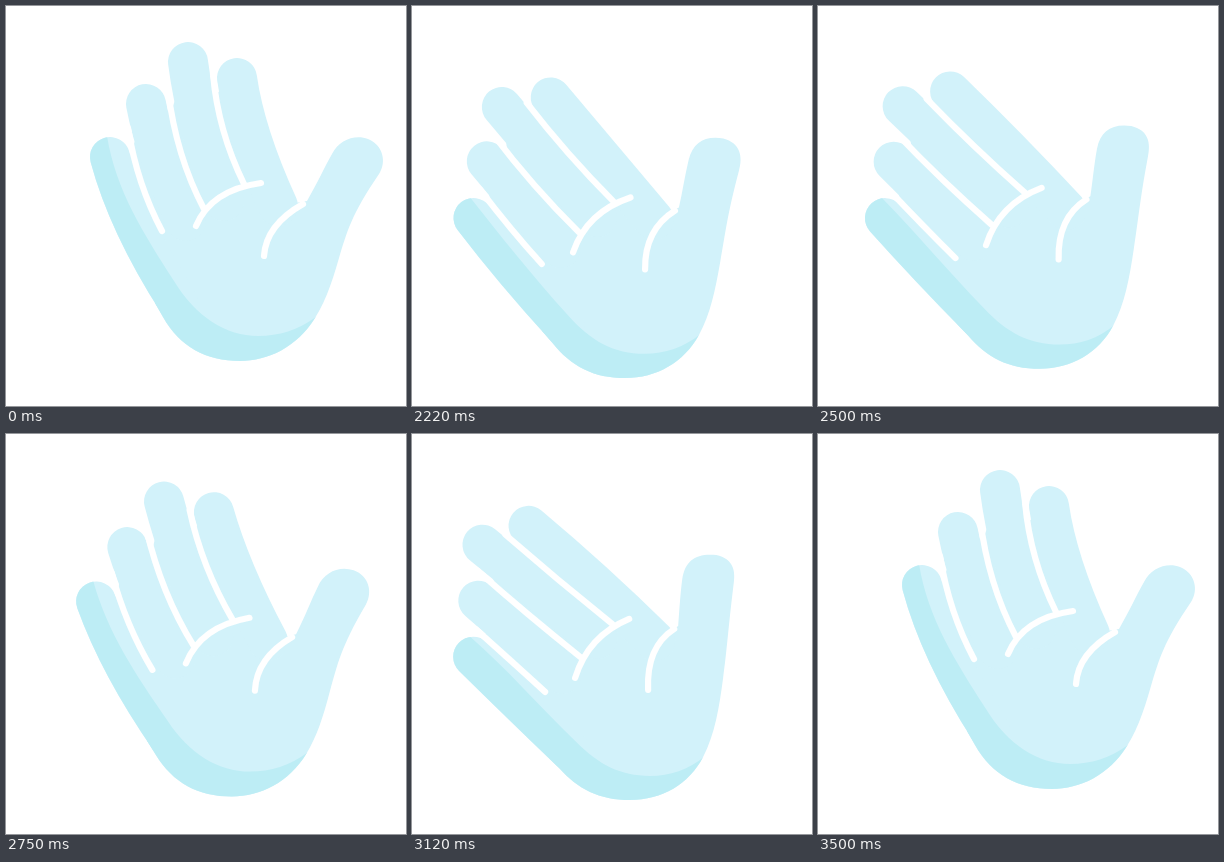
Recreate the animation shown at these times as an HTML page. Size 400x400 px, loop 3520 ms.

```html
<!DOCTYPE html>
<html lang="en">
<head>
<meta charset="utf-8">
<title>Waving hand</title>
<style>
  html, body { margin: 0; width: 100%; height: 100%; overflow: hidden; background: #fff; }
  svg { display: block; width: 100%; height: 100%; }
  #hand { color: #d2f2fa; }
  #fingers { fill: none; stroke: currentColor; stroke-width: 40; stroke-linecap: round; }
  #palm { fill: currentColor; }
  #shade { fill: #bdedf5; }
  #lines { fill: none; stroke: #fff; stroke-width: 6.2; stroke-linecap: round; stroke-linejoin: round; }
</style>
</head>
<body>
<svg viewBox="0 0 400 400">
  <defs>
    <g id="shape"><path id="palm"/><path id="fingers"/></g>
    <mask id="inside" maskUnits="userSpaceOnUse" x="0" y="0" width="400" height="400">
      <use href="#shape" color="#fff"/>
    </mask>
  </defs>
  <use id="hand" href="#shape"/>
  <g mask="url(#inside)"><path id="shade"/></g>
  <path id="lines"/>
</svg>
<script>
const LOOP = 3520;
const PIVOT = [245, 300];
const SHIFT = [-18, 9];   // travel of the palm at full bend
const DRIFT = [-9.5, 9.5]; // lead of the whole hand over the fingers

// Each part: upright outline, bent outline. Points pair up one to one.
const PARTS = {
  palm: [
    `M104 151 L125 148 L140 98 L165 106 L182 56 L210 88 L231 72 Q239 128 272 200 L301 195
     C312 176 318 162 326 148 C333 134 349 128 362 133 C377 139 381 156 373 168
     C345 209 341 226 333 252 C325 280 319 296 309 312
     C291 341 262 355 234 355 C200 355 174 341 157 311 L149 297 L172 296 Z`,
    `M61 223 L75 206 L66 167 L83 152 L70 111 L103 110 L116 92 Q182 147 243 207 L266 192
     C267 179 268 160 270 145 C273 126 284 119 304 121 C321 125 324 136 321 153
     C316 195 315 215 311 244 C307 274 303 300 291 323
     C277 350 250 366 218 366 C187 366 166 355 147 334 L136 323 L158 317 Z`],
  fingers: [
    `M104 151 Q122 218 172 296 M140 98 Q150 150 180 215
     M182 56 Q190 118 218 195 M231 72 Q239 128 272 200`,
    `M61 223 Q108 269 158 317 M66 167 Q110 205 150 240
     M70 111 Q128 158 185 205 M116 92 Q182 147 243 207`],
  shade: [
    `M101 130 C110 185 138 228 168 275 C190 311 220 330 252 330 C273 330 292 324 310 311
     L330 390 L150 390 L50 250 L60 110 Z`,
    `M58 203 C95 235 125 270 164 308 C187 331 208 342 238 342 C258 342 276 336 293 322
     L315 395 L150 400 L20 270 L20 190 Z`],
  lines: [
    `M122 122 Q131 178 156 225 M162 84 Q170 150 198 203 M207 68 Q212 125 238 178
     M190 220 Q205 184 255 177 M297 198 Q260 219 258 250`,
    `M64 196 Q100 228 133 258 M65 137 Q114 180 168 223 M93 101 Q145 146 200 190
     M163 244 Q176 202 217 185 M262 195 Q234 213 236 256`]
};

// [time, value]
const BEND = [[2000, 0], [2080, .09], [2220, .72], [2365, 1.3], [2500, .88], [2685, .01],
  [2750, .15], [2860, .75], [3000, 1.33], [3070, 1.2], [3120, 1], [3240, .4], [3370, .09], [3500, 0]];
const LEAD = [[2000, 0], [2080, .5], [2220, .95], [2365, .88], [2500, -.2], [2600, -.2], [2685, .1],
  [2750, .6], [2860, .95], [3000, .88], [3070, .25], [3120, 0], [3240, -.12], [3500, 0]];

const slope = (a, b) => (b[1] - a[1]) / (b[0] - a[0]);

function tangent(keys, i) {
  if (i === 0 || i === keys.length - 1) return 0;
  const p = slope(keys[i - 1], keys[i]), q = slope(keys[i], keys[i + 1]);
  return p * q <= 0 ? 0 : 2 * p * q / (p + q);
}

// Smooth curve through the keys, without overshoot
function curve(keys, t) {
  const last = keys.length - 1;
  if (t <= keys[0][0]) return keys[0][1];
  if (t >= keys[last][0]) return keys[last][1];
  const i = keys.findIndex(k => k[0] > t) - 1;
  const [t0, v0] = keys[i], [t1, v1] = keys[i + 1];
  const d = t1 - t0, u = (t - t0) / d, w = 1 - u;
  return v0 * w * w * (1 + 2 * u) + v1 * u * u * (3 - 2 * u)
    + d * u * w * (w * tangent(keys, i) - u * tangent(keys, i + 1));
}

// Turns a point pair into radius, angle and their change at full bend
function polar(x, y, bx, by) {
  const ax = x - PIVOT[0], ay = y - PIVOT[1];
  const cx = bx - SHIFT[0] - PIVOT[0], cy = by - SHIFT[1] - PIVOT[1];
  const r = Math.hypot(ax, ay);
  return {
    r, angle: Math.atan2(ay, ax),
    grow: Math.hypot(cx, cy) / r,
    turn: Math.atan2(ax * cy - ay * cx, ax * cx + ay * cy)
  };
}

function place(p, bend, lead) {
  const r = p.r * p.grow ** bend, a = p.angle + p.turn * bend;
  const x = PIVOT[0] + r * Math.cos(a) + SHIFT[0] * bend + DRIFT[0] * lead;
  const y = PIVOT[1] + r * Math.sin(a) + SHIFT[1] * bend + DRIFT[1] * lead;
  return x.toFixed(2) + " " + y.toFixed(2);
}

const PAIR = /(\d+) (\d+)/g;
const parts = Object.entries(PARTS).map(([id, [from, to]]) => {
  const ends = [...to.matchAll(PAIR)];
  const points = [...from.matchAll(PAIR)].map((m, i) =>
    polar(+m[1], +m[2], +ends[i][1], +ends[i][2]));
  return { el: document.getElementById(id), from, points };
});

function draw(t) {
  const bend = curve(BEND, t), lead = curve(LEAD, t);
  for (const { el, from, points } of parts) {
    let i = 0;
    el.setAttribute("d", from.replace(PAIR, () => place(points[i++], bend, lead)));
  }
}

const start = performance.now();
function tick() {
  draw((performance.now() - start) % LOOP);
  requestAnimationFrame(tick);
}
tick();
</script>
</body>
</html>
```
